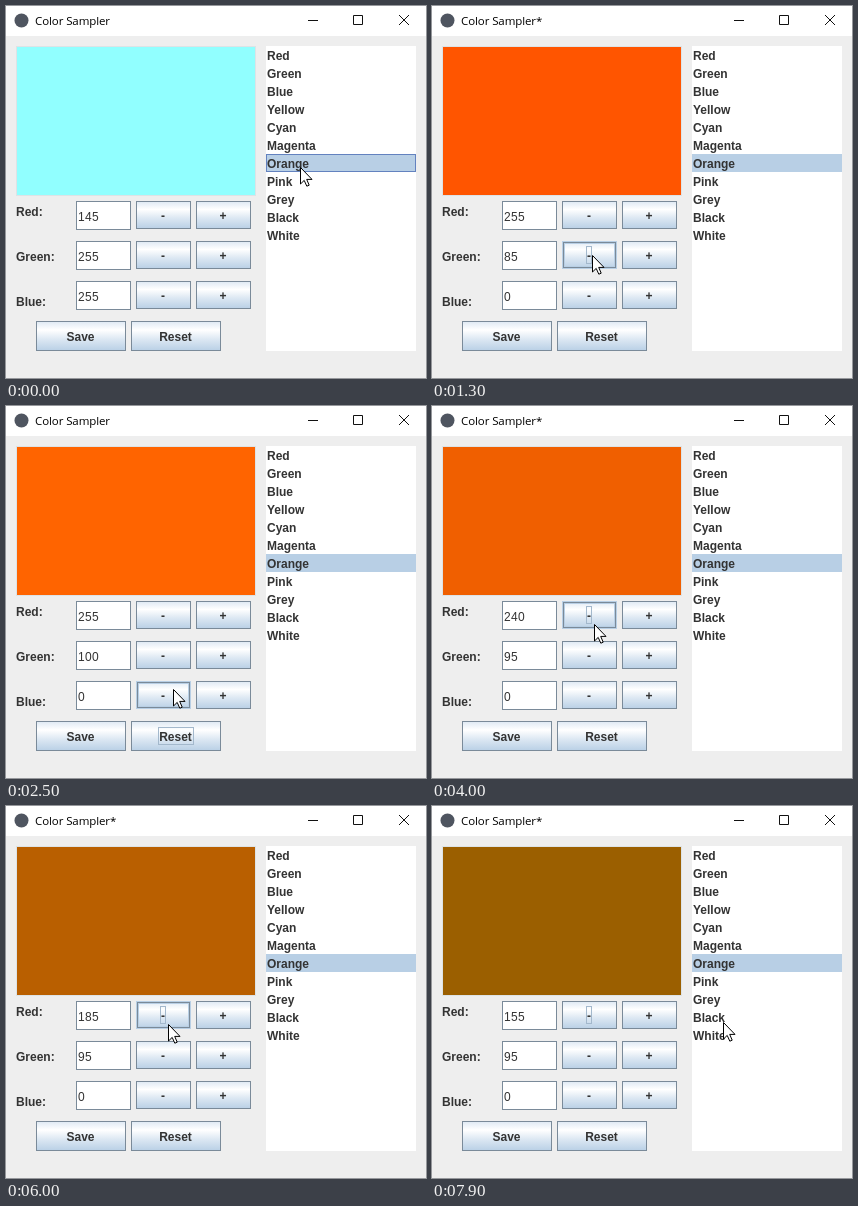
Animation, 420 px wide and 372 px high, one loop 8 s. Source, as an HTML page:

```html
<!DOCTYPE html>
<html lang="en">
<head>
<meta charset="utf-8">
<title>Color Sampler</title>
<style>
  html, body { margin: 0; width: 100%; height: 100%; overflow: hidden; background: #eee; }
  svg { display: block; }
  text { font: bold 12px "Liberation Sans", Arial, sans-serif; fill: #333; }
  .title { font: 11.5px "Open Sans", "Noto Sans", sans-serif; letter-spacing: -.1px; fill: #000; }
  .value { font-weight: normal; letter-spacing: .33px; }
  .mid { text-anchor: middle; }
  .line { fill: none; stroke: #7a8a99; }
  .face { fill: url(#metal); }
  .glow { fill: none; stroke: #b8cfe5; visibility: hidden; }
  .ring { fill: none; stroke: #a3b8cc; visibility: hidden; }
  .hot .glow, .focus .ring { visibility: visible; }
  .hot .edge, .down .glow { visibility: hidden; }
  .rim { visibility: hidden; }
  .hot .rim { visibility: visible; }
  .down .face { fill: #b8cfe5; }
  .down .edge { visibility: visible; }
  .down .rim { visibility: hidden; }
</style>
</head>
<body>
<svg id="stage" width="420" height="372" viewBox="0 0 420 372">
  <defs>
    <linearGradient id="metal" x2="0" y2="1">
      <stop stop-color="#dde8f3"/>
      <stop offset=".3" stop-color="#fff"/>
      <stop offset=".6" stop-color="#dde8f3"/>
      <stop offset="1" stop-color="#b8cfe5"/>
    </linearGradient>
  </defs>
  <rect width="420" height="372" fill="#eee"/>
  <rect width="420" height="30" fill="#fff"/>
  <circle cx="15.5" cy="14.5" r="7" fill="#4f5560"/>
  <text id="title" class="title" x="29" y="19"></text>
  <path d="M302 14.5h10M347.5 9.5h9v9h-9zM393 9l10 10M403 9l-10 10" fill="none" stroke="#111"/>
  <rect x="10.5" y="40.5" width="239" height="149" fill="none" stroke="#dde3e6"/>
  <rect id="swatch" x="11" y="41" width="238" height="148"/>
  <rect x="260" y="40" width="150" height="305" fill="#fff"/>
  <rect x="260" y="148" width="150" height="18" fill="#b8cfe5"/>
  <rect id="listFocus" x="260.5" y="148.5" width="149" height="17" fill="none" stroke="#6382bf"/>
  <g id="parts"></g>
  <path id="cursor" d="M.5 .5V17L4.2 13.4 6.8 19.2 9.2 18.2 6.7 12.4H12z" fill="#fff" stroke="#000"/>
</svg>
<script>
const $ = id => document.getElementById(id);
const LOOP = 8000, TICK = 100, HOLD = 60, GAP = 175;

const names = ["Red", "Green", "Blue", "Yellow", "Cyan", "Magenta",
  "Orange", "Pink", "Grey", "Black", "White"];
const channels = names.slice(0, 3);
const buttons = [];

const box = (cls, x, y, w, h) =>
  `<rect class="${cls}" x="${x + .5}" y="${y + .5}" width="${w - 1}" height="${h - 1}"/>`;
const label = (cls, x, y, s, id = "") =>
  `<text class="${cls}" x="${x}" y="${y}" id="${id}">${s}</text>`;

function button(id, text, x, y, w, h, ringW) {
  buttons.push({ id, x, y, w, h });
  const cx = x + w / 2, cy = y + h / 2;
  return `<g id="${id}"><rect class="face" x="${x}" y="${y}" width="${w}" height="${h}"/>`
    + box("line edge", x, y, w, h) + box("glow", x, y, w, h)
    + box("line rim", x + 1, y + 1, w - 2, h - 2) + box("glow", x + 2, y + 2, w - 4, h - 4)
    + box("ring", Math.floor(cx - ringW / 2), cy - 9, ringW, 18)
    + label("mid", cx - .5, cy + 5, text) + "</g>";
}

let html = names.map((n, i) => label("", 261, 54 + 18 * i, n)).join("");
channels.forEach((n, i) => {
  const y = 195 + 40 * i;
  html += label("", 10, 210 + 45 * i, n + ":")
    + `<rect x="70" y="${y}" width="55" height="29" fill="#fff"/>` + box("line", 70, y, 55, 29)
    + label("value", 72, y + 20, "", "value" + i)
    + button("minus" + i, "-", 130, y, 55, 28, 6)
    + button("plus" + i, "+", 190, y, 55, 28, 9);
});
html += button("save", "Save", 30, 315, 90, 30, 31)
  + button("reset", "Reset", 125, 315, 90, 30, 36);
$("parts").innerHTML = html;

// Runs of clicks: button, first release time, count
const clicks = [["minus1", 875, 4], ["reset", 2000, 1], ["minus1", 3000, 1], ["minus0", 3625, 20]]
  .flatMap(([id, start, n]) => Array.from({ length: n }, (_, k) => ({ id, up: start + GAP * k })));

// Pointer stops: time, x, y
const path = [[0, 294, 161], [100, 294, 161], [700, 160, 249], [1500, 160, 249],
  [1800, 172, 330], [2100, 172, 330], [2500, 167, 283], [2600, 167, 283],
  [2800, 163, 252], [3000, 163, 252], [3300, 162, 218], [7000, 162, 218],
  [7500, 322, 238], [7900, 291, 216], [LOOP, 291, 216]];

function pointer(t) {
  const i = path.findIndex(p => p[0] > t);
  const [t0, x0, y0] = path[i - 1], [t1, x1, y1] = path[i];
  const u = (t - t0) / (t1 - t0), e = u * u * (3 - 2 * u);
  return [Math.round(x0 + (x1 - x0) * e), Math.round(y0 + (y1 - y0) * e)];
}

function state(t) {
  let rgb = t < TICK ? [145, 255, 255] : [255, 100, 0];
  let dirty = false, focus = "", down = "";
  for (const { id, up } of clicks) {
    if (t < up - HOLD) break;
    focus = id;
    if (t < up) { down = id; break; }
    dirty = id !== "reset";
    if (dirty) rgb[+id.slice(-1)] -= 5;
    else rgb = [255, 100, 0];
  }
  return { rgb, dirty, focus, down };
}

function draw(t) {
  const { rgb, dirty, focus, down } = state(t), [px, py] = pointer(t);
  $("title").textContent = "Color Sampler" + (dirty ? "*" : "");
  $("swatch").setAttribute("fill", `rgb(${rgb})`);
  rgb.forEach((v, i) => $("value" + i).textContent = v);
  $("listFocus").style.visibility = focus ? "hidden" : "visible";
  for (const { id, x, y, w, h } of buttons) {
    const list = $(id).classList;
    list.toggle("hot", px >= x && px < x + w && py >= y && py < y + h);
    list.toggle("down", id === down);
    list.toggle("focus", id === focus);
  }
  $("cursor").setAttribute("transform", `translate(${px} ${py})`);
}

const begin = performance.now();
function frame() {
  const t = (performance.now() - begin) % LOOP;
  draw(Math.floor(t / TICK) * TICK);
  requestAnimationFrame(frame);
}
frame();
</script>
</body>
</html>
```
